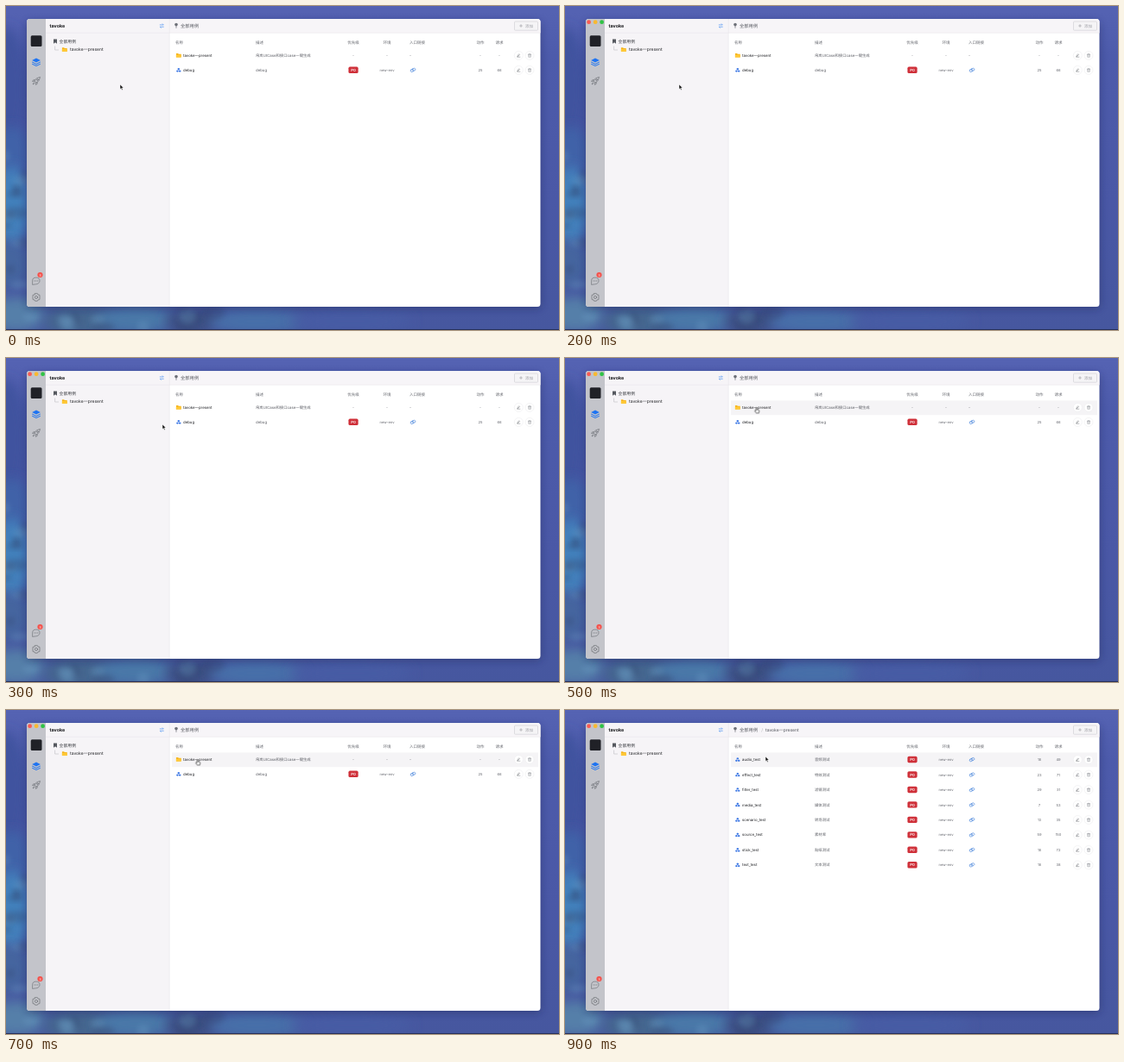
An HTML page for the animation above (1000 ms loop, 640x376 px).

```html
<!DOCTYPE html>
<html lang="en">
<head>
<meta charset="utf-8">
<title>Case list</title>
<style>
  html, body { margin: 0; width: 100%; height: 100%; overflow: hidden; background: #4656a0; }
  svg { display: block; width: 640px; height: 376px; }
  text { font-family: Inter, "Noto Sans CJK SC", "Noto Sans CJK", sans-serif; text-rendering: geometricPrecision; }
  .line { fill: none; stroke-linecap: round; stroke-linejoin: round; }
</style>
</head>
<body>
<svg id="stage" viewBox="0 0 640 376" xmlns="http://www.w3.org/2000/svg">
  <defs>
    <linearGradient id="sky" x1="0" y1="0" x2="0" y2="1">
      <stop offset="0" stop-color="#5563b3"/>
      <stop offset=".15" stop-color="#4d5bab"/>
      <stop offset=".6" stop-color="#4a58a6"/>
      <stop offset="1" stop-color="#46579f"/>
    </linearGradient>
    <filter id="soft" x="-50%" y="-50%" width="200%" height="200%"><feGaussianBlur stdDeviation="7"/></filter>
    <filter id="fine" x="-50%" y="-50%" width="200%" height="200%"><feGaussianBlur stdDeviation="3"/></filter>
    <filter id="shade" x="-10%" y="-10%" width="120%" height="125%"><feGaussianBlur stdDeviation="5"/></filter>
    <clipPath id="frame"><rect x="24" y="15" width="594.5" height="334" rx="3.5"/></clipPath>

    <g id="folder">
      <path d="M-2.9-2.4h2.2l.8.9H2.9V2.3H-2.9z" fill="#f6b51e"/>
      <path d="M-2.9-.6H2.9V2.3H-2.9z" fill="#ffc938"/>
    </g>
    <g id="cubes" fill="#3a76e4">
      <path d="M0-2.3 1.2-1.7V-.5L0 .1-1.2-.5V-1.7z"/>
      <path d="M-1.4.1-.2.7V1.8L-1.4 2.4-2.6 1.8V.7z"/>
      <path d="M1.4.1 2.6.7V1.8L1.4 2.4.2 1.8V.7z"/>
    </g>
    <g id="link" class="line" stroke="#4a86dc" stroke-width=".6" transform="rotate(-28)">
      <rect x="-3.1" y="-1.4" width="4" height="2.8" rx="1.4"/>
      <rect x="-.9" y="-1.4" width="4" height="2.8" rx="1.4"/>
    </g>
    <g id="edit">
      <circle r="5" fill="#fff" stroke="#ececef" stroke-width=".6"/>
      <path class="line" stroke="#6c6e74" stroke-width=".5" d="M-1.4 1-.8-.4.5-1.7 1.2-1 0 .4zM-1.5 1.8H1.6"/>
    </g>
    <g id="bin">
      <circle r="5" fill="#fff" stroke="#ececef" stroke-width=".6"/>
      <path class="line" stroke="#85878d" stroke-width=".45" d="M-1.7-1.2H1.7M-.6-1.3V-1.8H.6v.5M-1.3-1.1V1.9H1.3V-1.1M0-.2V1"/>
    </g>
    <g id="pin">
      <circle cy="-1.4" r="1.8" fill="#6d7078"/>
      <path d="M-.4 0H.4L.25 3H-.25z" fill="#6d7078"/>
    </g>
  </defs>

  <rect width="640" height="376" fill="url(#sky)"/>
  <g id="clouds"></g>
  <rect y="375" width="640" height="1" fill="#26305c"/>
  <rect x="24" y="18" width="595" height="333" rx="4" fill="#141d4c" opacity=".4" filter="url(#shade)"/>

  <g clip-path="url(#frame)">
    <rect x="24" y="15" width="595" height="335" fill="#fff"/>
    <rect x="24" y="15" width="22" height="335" fill="#c3c4ca"/>
    <rect x="46" y="15" width="143" height="335" fill="#f6f4f7"/>
    <rect x="189" y="15" width="430" height="16" fill="#f7f5f8"/>
    <path d="M46 31.2H619M189.2 15V350" stroke="#e8e6ea" stroke-width=".6"/>
  </g>

  <!-- rail -->
  <rect x="28.7" y="34.2" width="12.8" height="12.8" rx="1.5" fill="#202127"/>
  <g transform="translate(35 65)" fill="#1f74f2">
    <path d="M0-4.6 4.8-2.1 0 .4-4.8-2.1z"/>
    <path d="M-4.8-.6 0 1.9 4.8-.6V.5L0 3-4.8.5z"/>
    <path d="M-4.8 1.7 0 4.1 4.8 1.7V2.7L0 5-4.8 2.7z"/>
  </g>
  <g transform="translate(35 87)" class="line" stroke="#66696f" stroke-width=".6">
    <path d="M4.2-4.2C1.3-4.2-1-2.4-2 0L0 2C2.4 1 4.2-1.3 4.2-4.2zM-1.4-1.2H-3.4L-4.4.6-2 .1M1.2 1.4V3.4L-.6 4.4-.1 2M-2.6 1.7-4 4-1.7 2.6"/>
    <circle cx="1.4" cy="-1.4" r=".9"/>
  </g>
  <g transform="translate(34.8 319)" class="line" stroke="#66696f" stroke-width=".6">
    <path d="M-4.2 4V0A4.2 3.9 0 1 1 0 3.9z"/>
    <path d="M-1.9 0h.1M0 0h.1M1.9 0h.1" stroke-width=".9"/>
  </g>
  <circle cx="39.5" cy="312" r="3.1" fill="#f4514b"/>
  <g transform="translate(35 338)" class="line" stroke="#66696f" stroke-width=".65">
    <path d="M-1.4-4.3H1.4L2-3 4-2.6V2.6L2 3 1.4 4.3H-1.4L-2 3-4 2.6V-2.6L-2-3z"/>
    <circle r="1.6"/>
  </g>
  <g id="lights"></g>

  <!-- sidebar -->
  <path class="line" d="M178.2 21.9H182.3L181.2 20.8M182.3 24.2H178.2L179.3 25.3" stroke="#3f8af0" stroke-width=".65"/>
  <path d="M55 38.5h4v5.2L57 42.2 55 43.7z" fill="#55585f"/>
  <path d="M56.6 46.5V51H61" fill="none" stroke="#bdbcc2" stroke-width=".6"/>
  <use href="#folder" x="67.8" y="50.6"/>

  <!-- main header -->
  <use href="#pin" x="197" y="23"/>
  <rect x="588.5" y="18" width="27" height="10.2" rx="1" fill="#f5f4f6" stroke="#d3d2d6" stroke-width=".7"/>
  <path d="M594.2 23H597.8M596 21.2V24.8" stroke="#97989e" stroke-width=".6"/>

  <rect id="hover" x="192" y="49.4" width="424" height="16.8" fill="#f5f4f6"/>
  <g id="labels"></g>
  <g id="pageA"></g>
  <g id="pageB"></g>

  <g id="mouse">
    <path id="arrow" d="M0 0V5.5L1.3 4.4 2.2 6.4 3.2 6 2.3 4.1H4z" fill="#111" stroke="#fff" stroke-width=".5"/>
    <path id="hand" d="M-.9-.2Q-.9-.9-.3-.9T.3-.2V1.6L2.4 2Q3.1 2.2 3 3L2.6 5.4H-.6L-2.2 3.2Q-2.3 2.4-1.5 2.6L-.9 3.1z" fill="#fff" stroke="#222" stroke-width=".65"/>
  </g>
</svg>

<script>
const NS = "http://www.w3.org/2000/svg";
const LOOP = 1000;
const $ = id => document.getElementById(id);
const PROJECT = "tavoke", SUITE = PROJECT + "一present";

function add(parent, tag, attrs, content) {
  const el = document.createElementNS(NS, tag);
  for (const k in attrs) el.setAttribute(k, attrs[k]);
  if (content !== undefined) el.textContent = content;
  parent.appendChild(el);
  return el;
}

function label(parent, x, y, str, size = 4.35, fill = "#5c5e65", anchor = "start", weight = 400) {
  add(parent, "text", { x, y, "font-size": size, fill, "text-anchor": anchor, "font-weight": weight }, str);
}

// soft wallpaper: x, y, rx, ry, colour
[
  [0, 95, 24, 70, "#40529f"], [6, 170, 22, 30, "#3f62a8"], [6, 232, 22, 46, "#4380bb"],
  [4, 300, 22, 28, "#45659f"], [12, 358, 34, 20, "#557fa9"], [85, 366, 42, 18, "#45668f"],
  [150, 364, 45, 16, "#4a78a8"], [215, 366, 30, 14, "#3b4d80"], [290, 366, 55, 14, "#4670a9"],
  [400, 366, 70, 14, "#475ca4"]
].forEach(([cx, cy, rx, ry, fill]) =>
  add($("clouds"), "ellipse", { cx, cy, rx, ry, fill, filter: "url(#soft)" }));

// mottled lower left
let seed = 11;
const rnd = () => (seed = seed * 16807 % 2147483647) / 2147483647;
for (let i = 0; i < 28; i++) {
  const low = i % 2;
  add($("clouds"), "ellipse", {
    cx: low ? rnd() * 260 : rnd() * 24, cy: low ? 354 + rnd() * 20 : 170 + rnd() * 190,
    rx: 4 + rnd() * 9, ry: 3 + rnd() * 6,
    fill: rnd() < .5 ? "#6a9cc4" : "#32446f", opacity: .32, filter: "url(#fine)"
  });
}

["#fb5a52", "#f9b92f", "#2fc344"].forEach((fill, i) =>
  add($("lights"), "circle", { cx: 27.6 + i * 7.5, cy: 18.7, r: 2.4, fill }));

const fixed = $("labels");
label(fixed, 39.5, 313.5, "3", 4, "#fff", "middle");
label(fixed, 50.5, 25.2, PROJECT, 5.4, "#17181b", "start", 700);
label(fixed, 61.5, 43, "全部用例", 4.9, "#36383d", "start", 500);
label(fixed, 74, 52.4, SUITE, 5, "#25262a");
label(fixed, 202, 25, "全部用例", 5.3, "#55575e");
label(fixed, 601, 24.7, "添加", 4.4, "#97989e");
[[196, "名称"], [289, "描述"], [402, "优先级", 1], [441, "环境", 1],
 [467, "入口链接"], [549, "动作", 1], [571, "请求", 1]].forEach(([x, str, mid]) =>
  label(fixed, x, 43.7, str, 4.5, "#63656c", mid ? "middle" : "start"));

function row(page, y, name, note, acts, reqs) {
  const leaf = acts !== undefined, base = y + 1.5;
  const mid = (x, str) => label(page, x, base, str, 4.1, "#63656c", "middle");
  add(page, "use", { href: leaf ? "#cubes" : "#folder", x: 199.8, y: y - .1 });
  label(page, 205, base, name, 4.35, "#1f2024");
  label(page, 289, base, note);
  if (leaf) {
    add(page, "rect", { x: 396.4, y: y - 3.8, width: 11.2, height: 7.4, rx: 1.6, fill: "#cf3039" });
    label(page, 402, base, "P0", 4.3, "#fff", "middle", 600);
    add(page, "use", { href: "#link", transform: `translate(471 ${y})` });
  } else {
    mid(402, "-");
    label(page, 467, base, "-");
  }
  mid(441, leaf ? "new-env" : "-");
  mid(549, leaf ? acts : "-");
  mid(571, leaf ? reqs : "-");
  add(page, "use", { href: "#edit", x: 593.3, y });
  add(page, "use", { href: "#bin", x: 606, y });
}

row($("pageA"), 57.4, SUITE, "帛岚UICase和接口case一键生成");
row($("pageA"), 74.4, "debug", "debug", 25, 66);

label($("pageB"), 227.2, 25, "/", 5, "#b0b1b6");
label($("pageB"), 232, 25, SUITE, 5, "#55575e");
[["audio", "音频测试", 18, 49], ["effect", "特效测试", 23, 71], ["filter", "滤镜测试", 29, 31],
 ["media", "媒体测试", 7, 53], ["scenario", "转场测试", 13, 35], ["source", "素材库", 59, 150],
 ["stick", "贴纸测试", 18, 72], ["text", "文本测试", 18, 38]].forEach(([name, note, a, r], i) =>
  row($("pageB"), 57.6 + i * 17.47, name + "_test", note, a, r));

// holds each [ms, value] until the next one
function hold(id, prop, steps) {
  const frames = [...steps, [LOOP, steps[steps.length - 1][1]]]
    .map(([ms, v]) => ({ offset: ms / LOOP, [prop]: v, easing: "step-end" }));
  $(id).animate(frames, { duration: LOOP, iterations: Infinity });
}
const at = (x, y) => `translate(${x}px, ${y}px)`;

hold("lights", "opacity", [[0, 0], [200, 1]]);
hold("hover", "opacity", [[0, 0], [400, 1]]);
hold("pageA", "opacity", [[0, 1], [800, 0]]);
hold("pageB", "opacity", [[0, 0], [800, 1]]);
hold("arrow", "opacity", [[0, 1], [500, 0], [900, 1]]);
hold("hand", "opacity", [[0, 0], [500, 1], [900, 0]]);
hold("mouse", "transform", [[0, at(132, 91)], [300, at(181, 77)], [400, at(222.8, 59.8)],
  [500, at(221.8, 58.4)], [900, at(232, 54)]]);
</script>
</body>
</html>
```
